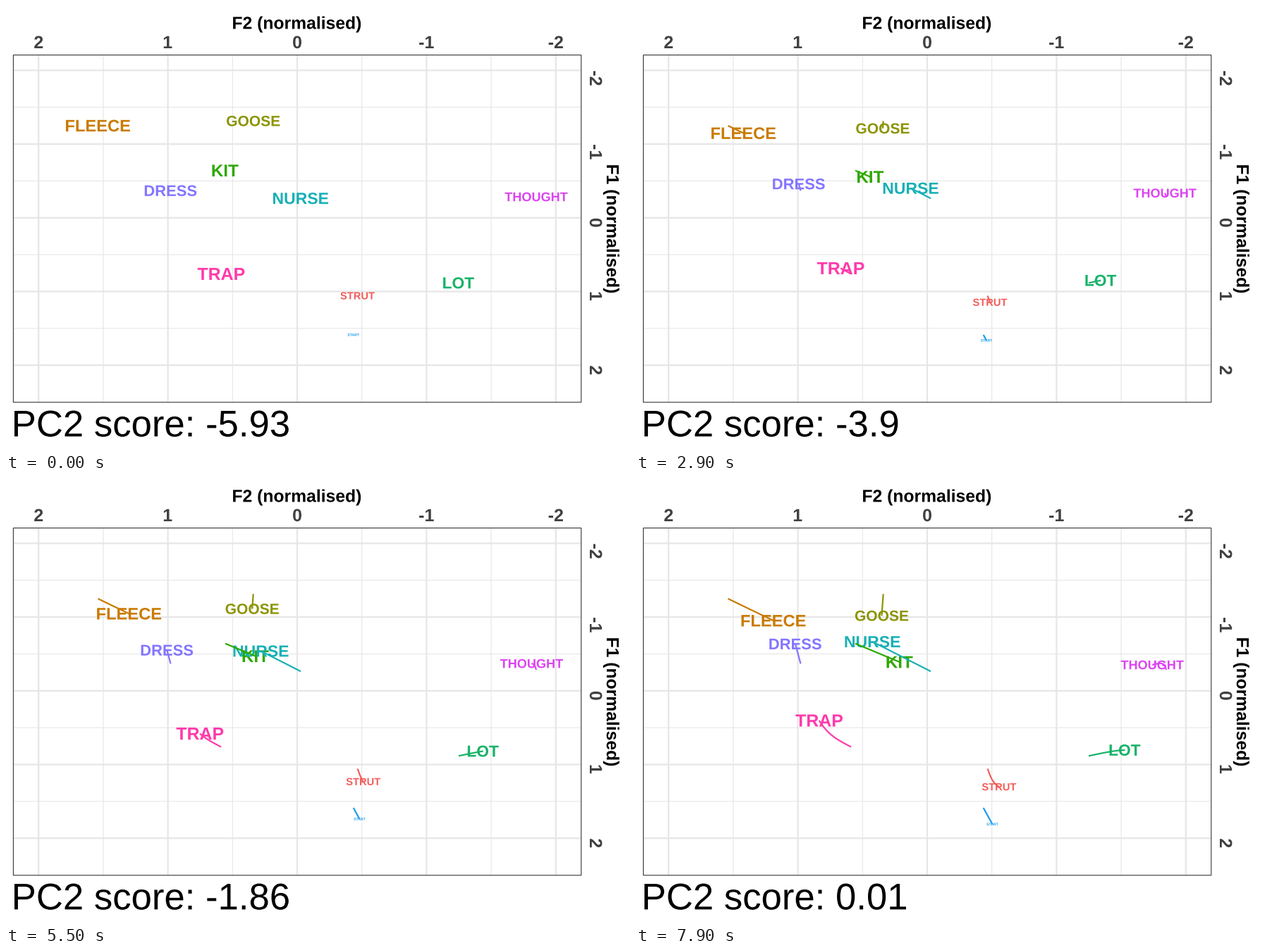
A matplotlib script for the animation above (8000 ms loop, 885x632 px).

```python
import matplotlib.pyplot as plt
import numpy as np
from matplotlib.animation import FuncAnimation
from matplotlib.patches import PathPatch, Rectangle
from matplotlib.textpath import TextPath
from matplotlib.transforms import Affine2D

W, H, DPI = 885, 632, 100
PX = 72 / DPI
STEPS = 38
STRAIGHT = (0, 0)

# word, colour, text size, first centre, last centre, bend of the path
WORDS = [
    ("DRESS", "#8475FF", 22.0, (233.5, 262.3), (226, 234.3), STRAIGHT),
    ("FLEECE", "#CA7A00", 23.7, (130.5, 170), (195, 201.2), STRAIGHT),
    ("GOOSE", "#8B9400", 21.0, (350.7, 163.3), (348.5, 194.2), STRAIGHT),
    ("KIT", "#2EA800", 24.2, (311, 233.7), (374, 260), STRAIGHT),
    ("LOT", "#18B369", 22.8, (642, 393.3), (693.5, 385), (-1, -2.3)),
    ("NURSE", "#17B0B5", 23.0, (418, 273.2), (335.5, 231.1), STRAIGHT),
    ("START", "#1C9DEC", 5.1, (492.7, 467), (505.5, 490.3), STRAIGHT),
    ("STRUT", "#F35E5A", 14.7, (498.6, 411.5), (515, 437.2), (-6.4, 1.5)),
    ("THOUGHT", "#DC44F2", 18.1, (752, 271), (732.2, 264), (15, -8.8)),
    ("TRAP", "#FF3AAB", 24.9, (305, 380.5), (259.7, 343), (2, 14.5)),
]

plt.rcParams["toolbar"] = "None"
fig = plt.figure(figsize=(W / DPI, H / DPI), dpi=DPI, facecolor="white")
ax = fig.add_axes([0, 0, 1, 1])
ax.set_xlim(0, W)
ax.set_ylim(H, 0)
ax.axis("off")


def outline(text, size, anchor, weight="bold"):
    """Text outline in pixels, y down, moved so its anchor is at 0, 0."""
    path = TextPath((0, 0), text, size=size,
                    prop={"family": "Liberation Sans", "weight": weight})
    box = path.get_extents()
    mid_x, mid_y = (box.x0 + box.x1) / 2, (box.y0 + box.y1) / 2
    dx, dy = {"left": (box.x0, 0), "mid": (mid_x, 0),
              "centre": (mid_x, mid_y)}[anchor]
    return path.transformed(Affine2D().translate(-dx, -dy).scale(1, -1))


def place(patch, x, y, turn=0):
    patch.set_transform(Affine2D().rotate_deg(turn).translate(x, y) + ax.transData)


def label(x, y, text, size, color, anchor="mid", turn=0, weight="bold"):
    patch = PathPatch(outline(text, size, anchor, weight), fc=color, lw=0, zorder=3)
    ax.add_artist(patch)
    place(patch, x, y, turn)
    return patch


def line(xs, ys, color, width, z):
    return ax.plot(xs, ys, color=color, lw=width * PX, zorder=z, snap=False,
                   solid_capstyle="butt")[0]


def px_x(v):
    return 413 - 183.4 * v


def px_y(v):
    return 300.8 + 104.7 * v


for half in range(-4, 5):
    v, width = half / 2, 1.1 if half % 2 else 2.2
    line([px_x(v)] * 2, [69, 563], "#E6E6E6", width, 1)
    line([10, 816], [px_y(v)] * 2, "#E6E6E6", width, 1)
    if half % 2 == 0:
        label(px_x(v), 60, f"{v:g}", 25, "#404040")
        label(828, px_y(v) + 1, f"{v:g}", 25, "#404040", "left", turn=90)

ax.add_patch(Rectangle((10.4, 69.6), 805.4, 493.2, fill=False, ec="#333333",
                       lw=1.1 * PX, zorder=5, snap=False))
label(412.6, 32.5, "F2 (normalised)", 24.7, "black")
label(852, 316.7, "F1 (normalised)", 24.7, "black", turn=90)
score = label(12, 611.3, "0", 52.7, "black", "left", weight="normal")


def track(start, end, bend):
    """Even drift from start to end, with a bend that turns late."""
    u = np.linspace(0, 1, STEPS + 1)[:, None]
    start, end, bend = map(np.array, (start, end, bend))
    return start + (end - start) * u + bend * (u - u**4)


movers = [(label(0, 0, word, size, color, "centre"),
           line([], [], color, 2.2, 4),
           track(start, end, bend))
          for word, color, size, start, end, bend in WORDS]


def draw(frame):
    # the first step holds for 500 ms, each later one for 200 ms
    k = 0 if frame < 5 else (frame - 5) // 2 + 1
    for word, trail, path in movers:
        place(word, *path[k])
        trail.set_data(*path[:k + 1].T)
    value = round(-5.93 + 0.1564 * k, 2)
    score.set_path(outline(f"PC2 score: {value:g}", 52.7, "left", "normal"))
    return [score]


anim = FuncAnimation(fig, draw, frames=80, interval=100, repeat=True,
                     repeat_delay=0, blit=False)
plt.show()
```
